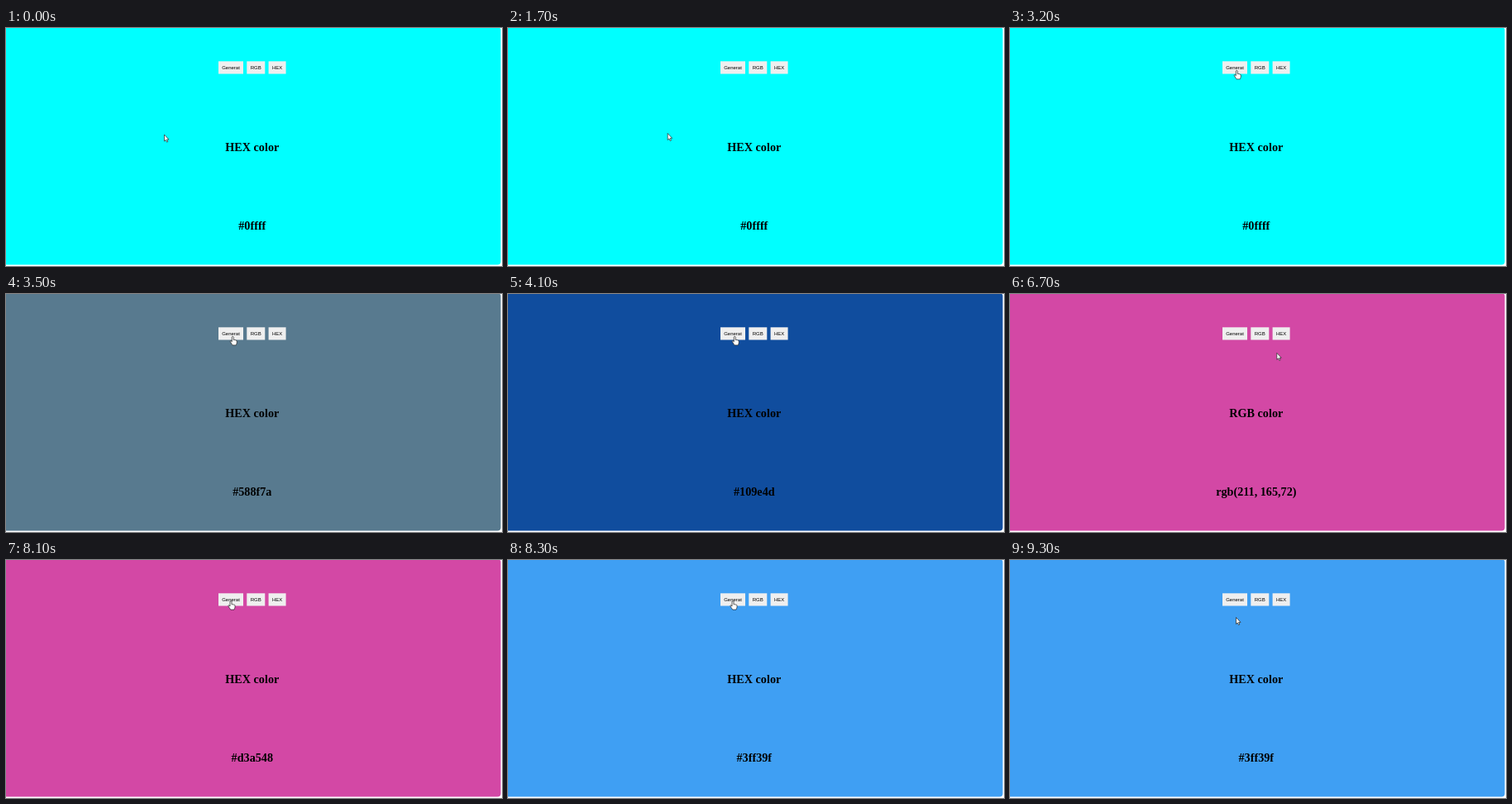
Recreate the animation shown at these times as an HTML page. Size 600x288 px, loop 9.4 s.

```html
<!DOCTYPE html>
<html lang="en">
<meta charset="utf-8">
<title>Colour generator</title>
<style>
  html, body { margin: 0; width: 100%; height: 100%; overflow: hidden; background: #fff; }
  svg { display: block; }
  text { text-anchor: middle; }
  .button { font: 6px "Liberation Sans", Arial, sans-serif; }
  .heading { font: bold 14.2px "Liberation Serif", "Times New Roman", serif; }
  #arrow, #hand { fill: #fff; stroke: #222; stroke-width: .7; stroke-linejoin: round; }
</style>
<svg width="600" height="288" viewBox="0 0 600 288">
  <path id="page" d="M0 0H597Q598.5 0 598.5 2V282.5Q598.5 286.5 594.5 286.5H0Z"/>
  <g id="buttons"></g>
  <text class="heading" id="title" x="297.8" y="149.2"></text>
  <text class="heading" id="value" x="297.8" y="244.1"></text>
  <path id="arrow" d="M0 0V8L1.8 6.4L3 9.1L4.3 8.5L3.1 5.9H5.5Z"/>
  <path id="hand" d="M-1 .8Q-1 0 0 0T1 .8V4Q2 3.4 2.6 4.3Q3.5 3.8 4 4.7Q5 4.4 5 5.5V7.5Q4.6 9 4 10.4H-.3Q-1.4 8.8-3 6.2Q-3.4 5-2.3 5L-1 6.2Z"/>
</svg>
<script>
const LOOP = 9400, STEP = 100;
const TOP = 40.3, HEIGHT = 15.2, GAP = 4.3;
const $ = id => document.getElementById(id);

let left = 257;
const buttons = [["Generat", 30], ["RGB", 22], ["HEX", 21]].map(([label, width]) => {
  const x = left;
  left += width + GAP;
  return { label, x, width };
});

// Each click sets a new colour or a new notation.
const clicks = [
  [0, "HEX"], [0, "#00ffff"], [3400, "#587a8f"], [4100, "#104d9e"],
  [5100, "RGB"], [5900, "#d348a5"], [7500, "HEX"], [8300, "#3f9ff3"]
];

// Pointer moves: start time, end time, x, y of the tip at the end.
const moves = [
  [0, 1, 191.5, 129], [1600, 2800, 274.3, 51.5], [4300, 4800, 306, 51],
  [5400, 5800, 278, 48.6], [6300, 6800, 328, 74], [6900, 7200, 328, 49],
  [7600, 8100, 272, 49.7], [8300, 8500, 273.5, 69.5]
];

$("buttons").innerHTML = buttons.map(({ label, x, width }) =>
  `<rect x="${x}" y="${TOP}" width="${width}" height="${HEIGHT}" fill="#efefef"/>
   <text class="button" x="${x + width / 2}" y="50.1">${label}</text>`).join("");

const latest = (t, isColor) =>
  clicks.filter(([time, what]) => time <= t && (what[0] === "#") === isColor).pop()[1];

const ease = k => k * k * (3 - 2 * k);

function pointerAt(t) {
  let [, , x, y] = moves[0];
  for (const [start, end, toX, toY] of moves) {
    const k = ease(Math.min(1, Math.max(0, (t - start) / (end - start))));
    x += (toX - x) * k;
    y += (toY - y) * k;
  }
  return [x, y];
}

function draw(t) {
  const color = latest(t, true), mode = latest(t, false);
  const [r, g, b] = [1, 3, 5].map(i => parseInt(color.slice(i, i + 2), 16));
  $("page").setAttribute("fill", color);
  $("title").textContent = mode + " color";
  // The page prints blue before green, without zero padding.
  $("value").textContent = mode === "RGB"
    ? `rgb(${r}, ${b},${g})`
    : "#" + [r, b, g].map(n => n.toString(16)).join("");

  const [x, y] = pointerAt(t);
  const over = y >= TOP && y <= TOP + HEIGHT &&
    buttons.some(button => x >= button.x && x <= button.x + button.width);
  for (const id of ["arrow", "hand"]) {
    $(id).setAttribute("transform", `translate(${x} ${y})`);
    $(id).style.display = over === (id === "hand") ? "" : "none";
  }
}

const start = performance.now();
function tick() {
  const t = (performance.now() - start) % LOOP;
  draw(Math.floor(t / STEP) * STEP);
  requestAnimationFrame(tick);
}
tick();
</script>
</html>
```
